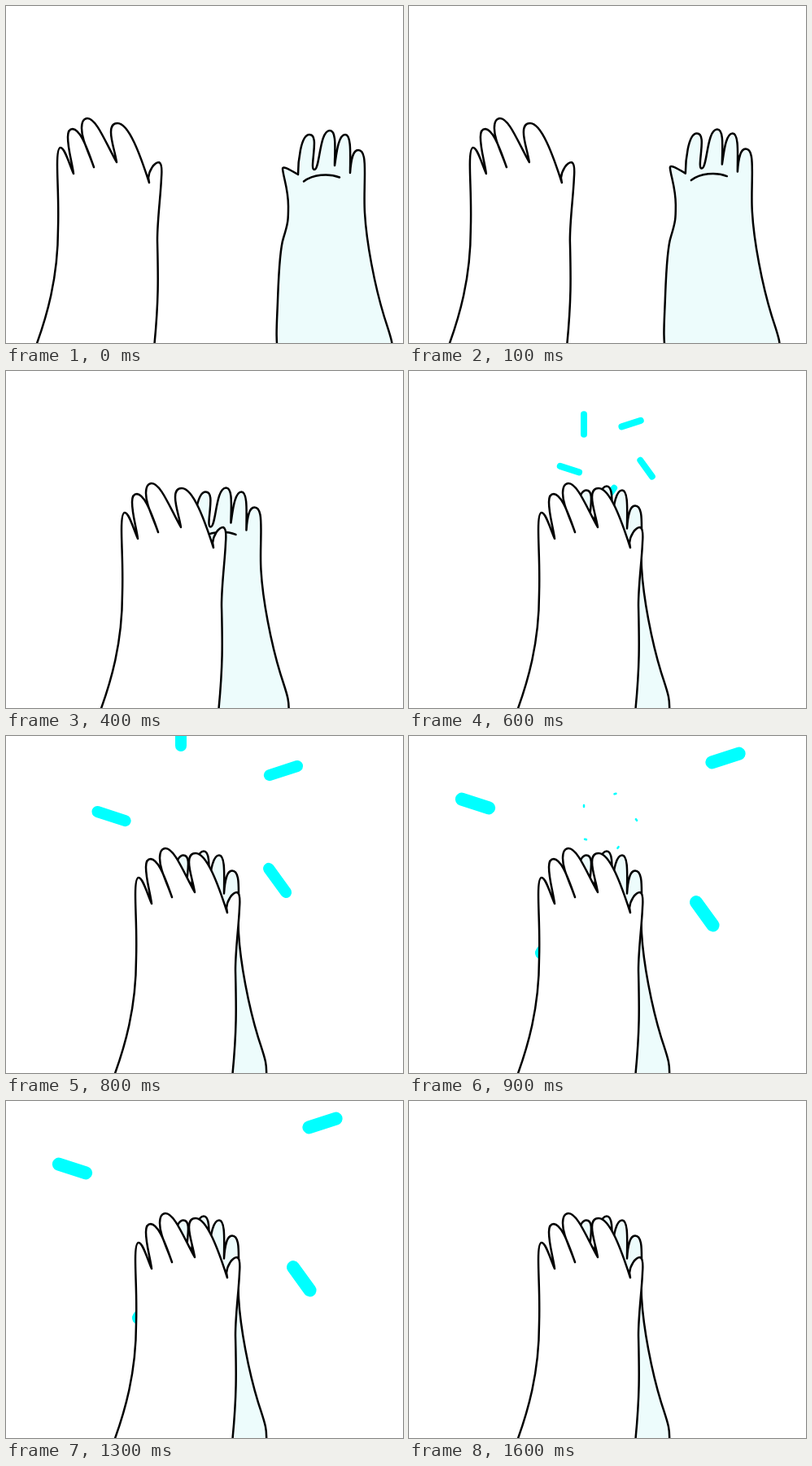
Recreate the animation shown at these times as an HTML page with a canvas. Size 488 by 414 pixels, loop 2.4 s.

```html
<!DOCTYPE html>
<html lang="en">
<head>
<meta charset="utf-8">
<title>High five</title>
<style>
  html, body { margin: 0; width: 100%; height: 100%; overflow: hidden; background: #fff; }
  canvas { display: block; width: 488px; height: 414px; }
</style>
</head>
<body>
<canvas id="stage" width="488" height="414"></canvas>
<script>
const ctx = document.getElementById('stage').getContext('2d');
const LOOP = 2400, STEP = 100;

const frontHand = {
  fill: '#fff', dx: 96, dy: 0,
  outline: new Path2D(`M36 420 C50 382 64 335 64 273 C65 240 63 215 63 195
    C63 182 64 174 67 174 C72 174 77 192 83 206
    C81 191 76 176 76 161 C76 154 78 151 82 151 C90 152 97 166 108 198
    C101 178 93 164 93 150 C93 142 96 138 100 138 C111 138 122 167 136 192
    C134 179 129 166 129 155 C129 148 132 144 137 144 C151 144 165 183 176 217
    L175 211 C176 202 182 192 188 192 C191 193 192 199 191 211
    C190 235 186 262 186 288 C187 330 188 360 182 420`)
};

const backHand = {
  fill: '#edfcfc', dx: -155, dy: -11.6,
  outline: new Path2D(`M335 430 C331 410 333 390 334 362 C335 335 336 300 341 285
    C347 266 347 262 347 246 C347 225 341 211 340 200 C340 196 347 200 359 207
    C359 193 362 158 373 158 C381 158 379 172 378 183 C377 193 376 201 379 201
    C386 201 385 153 398 153 C407 153 404 179 404 196
    C406 184 408 158 417 158 C425 158 423 185 423 205
    C424 190 426 177 433 177 C441 177 441 192 441 205
    C441 222 440 238 441 254 C443 290 453 343 465 382 C473 407 476 413 475 430`),
  crease: new Path2D('M366 215.500 C377 207 396 205 410 210.500')
};

// Start point and heading (degrees) of each spark
const sparks = [
  [215, 86, -90], [253.500, 71, -18], [279.500, 103, 54],
  [257, 137, 126], [217, 127, 198]
];
// Distance travelled, length and width at each step of a burst
const burst = [
  [0, 2, 2.5], [20.6, 24.5, 8], [45, 32, 11], [92, 36, 14],
  [142.5, 35, 16], [173, 19, 11.5], [193, 3, 6]
];
const burstStarts = [500, 900];

function swing(t) {
  const sine = ms => (1 - Math.cos(Math.PI * Math.min(1, ms / 620))) / 2;
  const first = sine(50);
  return (sine(t + 50) - first) / (1 - first);
}

function drawBurst(age) {
  const pose = burst[age / STEP];
  if (!pose) return;
  const [distance, length, width] = pose;
  ctx.strokeStyle = '#0ff';
  ctx.lineWidth = width;
  for (const [x, y, degrees] of sparks) {
    ctx.save();
    ctx.translate(x, y);
    ctx.rotate(degrees * Math.PI / 180);
    ctx.beginPath();
    ctx.moveTo(distance - length / 2, 0);
    ctx.lineTo(distance + length / 2, 0);
    ctx.stroke();
    ctx.restore();
  }
}

function drawHand(hand, progress) {
  ctx.save();
  ctx.translate(hand.dx * progress, hand.dy * progress);
  ctx.fillStyle = hand.fill;
  ctx.strokeStyle = '#000';
  ctx.lineWidth = 2.5;
  ctx.fill(hand.outline);
  ctx.stroke(hand.outline);
  if (hand.crease) ctx.stroke(hand.crease);
  ctx.restore();
}

function draw(now) {
  const t = Math.floor((now % LOOP) / STEP) * STEP;
  const progress = swing(t);
  ctx.fillStyle = '#fff';
  ctx.fillRect(0, 0, 488, 414);
  burstStarts.forEach(start => drawBurst(t - start));
  drawHand(backHand, progress);
  drawHand(frontHand, progress);
}

ctx.lineCap = ctx.lineJoin = 'round';
const begin = performance.now();
function tick() {
  draw(performance.now() - begin);
  requestAnimationFrame(tick);
}
tick();
</script>
</body>
</html>
```
